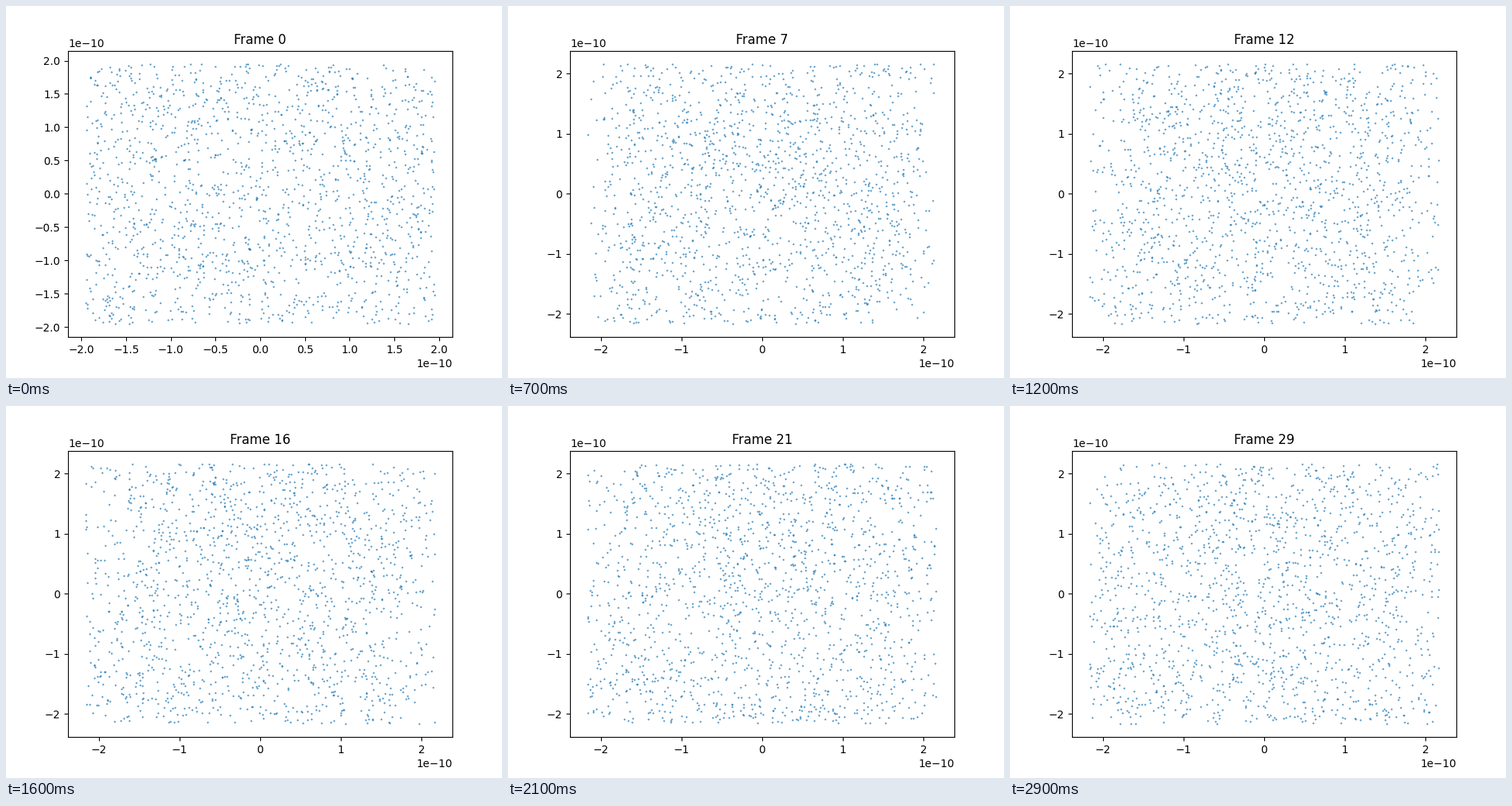
A matplotlib script for the animation above (3 s loop, 640 px wide and 480 px high).

```python
import numpy as np
import matplotlib.pyplot as plt
from matplotlib.animation import FuncAnimation

FRAMES = 30
COUNT = 1600
SCALE = 1e-10
START = 1.955   # half width of the cloud at rest
WALL = 2.167    # half width of the closed box

rng = np.random.default_rng(7)
x0, y0 = rng.uniform(-START, START, (2, COUNT))
vx = rng.normal(0, 0.023, COUNT)
vy = rng.normal(0, 0.12, COUNT)


def reach(rate, frame):
    """Distance the outermost particles have got to, up to the wall."""
    return min(WALL, START + rate * frame)


def bounce(pos, low, high):
    """Fold free flight back between two reflecting edges."""
    span = high - low
    return low + span - np.abs((pos - low) % (2 * span) - span)


def padded(low, high):
    pad = 0.05 * (high - low)
    return (low - pad) * SCALE, (high + pad) * SCALE


fig, ax = plt.subplots(figsize=(6.4, 4.8), dpi=100)
dots, = ax.plot([], [], ".", color="C0", markersize=1)


def update(frame):
    left, right = -reach(0.05, frame), reach(0.044, frame)
    top = reach(0.12, frame)
    x = bounce(x0 + vx * frame, left, right)
    y = bounce(y0 + vy * frame, -top, top)
    dots.set_data(x * SCALE, y * SCALE)
    ax.set_xlim(padded(left, right))
    ax.set_ylim(padded(-top, top))
    ax.set_title(f"Frame {frame}")
    return dots,


anim = FuncAnimation(fig, update, frames=FRAMES, interval=100,
                     repeat=True, repeat_delay=0, blit=False)
plt.show()
```
